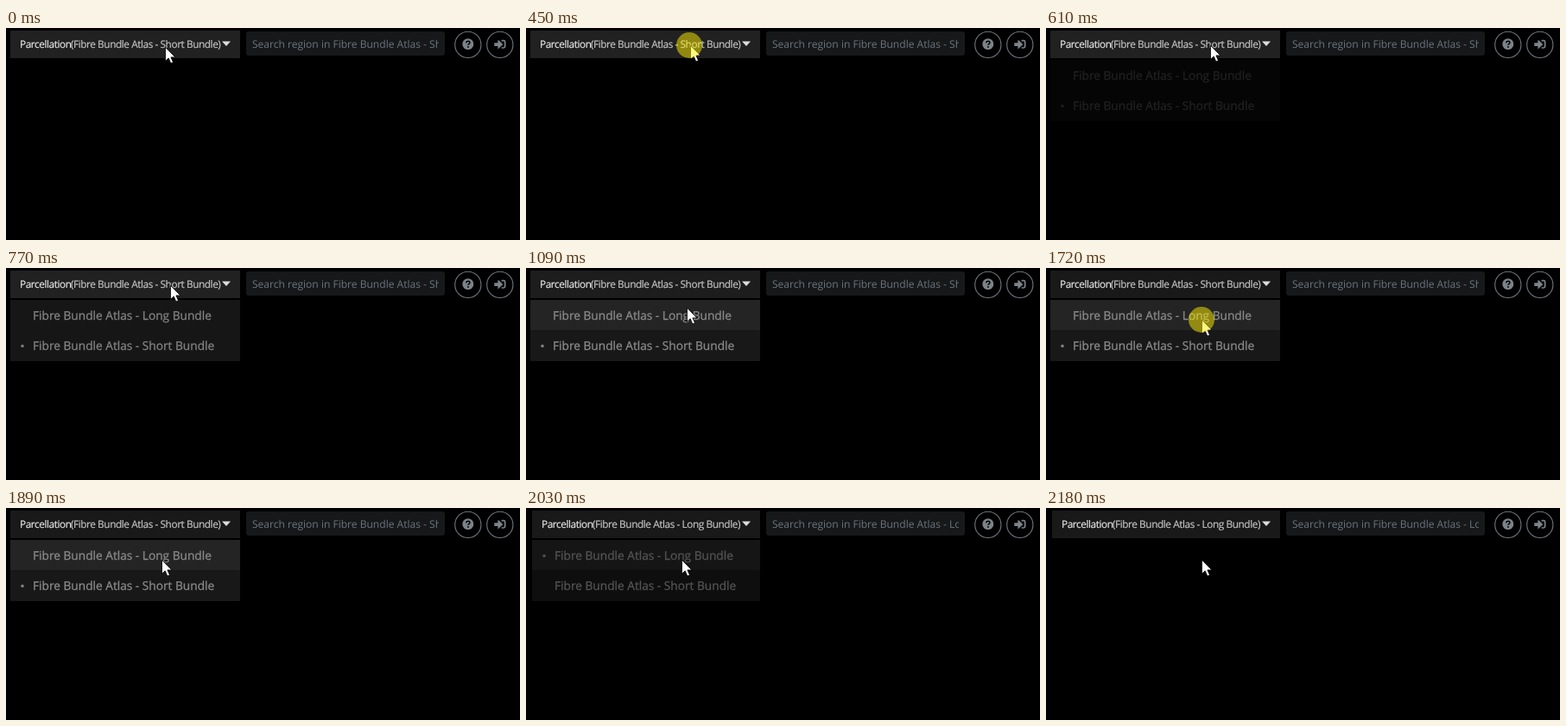
Write an HTML page that moves like this. It is 595 px wide and 246 px high and loops after 2500 ms.

```html
<!DOCTYPE html>
<html lang="en">
<head>
<meta charset="utf-8">
<style>
html, body { margin: 0; width: 100%; height: 100%; overflow: hidden; background: #000; }
svg { display: block; }
text { font-family: "Open Sans", "Noto Sans", sans-serif; text-rendering: geometricPrecision; white-space: pre; }
.title { font-size: 11.8px; letter-spacing: -.42px; stroke-width: .2; }
.item { font-size: 13.7px; fill: #8a8a8a; stroke: #8a8a8a; stroke-width: .3; }
.search { font-size: 12.06px; fill: #6c757d; }
.ring { fill: none; stroke: #6c757d; stroke-width: 1.1; }
.icon { fill: #7b838a; }
</style>
</head>
<body>
<svg width="595" height="246" viewBox="0 0 595 246">
  <clipPath id="field"><rect x="285" y="4" width="216" height="28"/></clipPath>

  <rect id="button" y="3" height="32"/>
  <g id="title" class="title">
    <text x="16" y="23.3" fill="#e4e4e4" stroke="#e4e4e4">Parcellation</text>
    <text id="choice" x="75" y="23.3" fill="#c2c2c2" stroke="#c2c2c2"></text>
  </g>
  <path d="M250 15.5h10l-5 5.5z" fill="#dcdcdc"/>

  <rect x="278" y="4" width="230" height="28" rx="3" fill="#16181a"/>
  <text id="search" class="search" x="285" y="23" clip-path="url(#field)"></text>

  <circle class="ring" cx="534.8" cy="19.4" r="15.1"/>
  <circle class="icon" cx="534.8" cy="18.7" r="6.5"/>
  <path d="M532.8 17.3q.2-2 2.1-2 2 0 2 1.7 0 1-1.1 1.6-.9.5-.9 1.2" fill="none" stroke="#000" stroke-width="1.5"/>
  <circle cx="534.9" cy="21.9" r=".95"/>

  <circle class="ring" cx="571.8" cy="19.4" r="15.1"/>
  <path class="icon" transform="translate(565.2 12.2) scale(.026)" d="M416 448h-84q-12 0-12-12v-40q0-12 12-12h84q32 0 32-32V160q0-32-32-32h-84q-12 0-12-12V76q0-12 12-12h84q96 0 96 96v192q0 96-96 96zM369 247 201 79c-15-15-41-4.5-41 17v96H24q-24 0-24 24v96q0 24 24 24h136v96c0 21.5 26 32 41 17l168-168q14-17 0-34z"/>

  <g id="menu">
    <rect id="row0" y="37" height="35"/>
    <rect id="row1" y="72" height="36"/>
    <g id="items" class="item">
      <text x="31" y="60">Fibre Bundle Atlas - Long Bundle</text>
      <text x="31" y="95">Fibre Bundle Atlas - Short Bundle</text>
      <circle id="dot" cx="19" r="1.6"/>
    </g>
  </g>

  <path id="cursor" d="M0 0V16L3.7 12.6 6.3 18.6 9 17.4 6.4 11.6H11.4Z" fill="#fff" stroke="#000" stroke-width=".8"/>
  <circle id="click" r="15" fill="#fff000" fill-opacity=".5"/>
</svg>
<script>
const LOOP = 2500;
// The screen refreshes only at these moments.
const TICKS = [0, 210, 290, 370, 450, 610, 690, 770, 860, 930, 1010, 1090, 1160,
  1250, 1330, 1400, 1490, 1570, 1650, 1720, 1890, 1950, 2030, 2110, 2180];
// start, end, x and y reached
const MOVES = [[150, 370, 190, 20], [860, 1330, 182, 74], [1330, 1650, 180, 60]];

const $ = id => document.getElementById(id);
const set = (id, attrs) => {
  for (const k in attrs) $(id).setAttribute(k, attrs[k]);
};
const ramp = (t, a, b) => Math.min(1, Math.max(0, (t - a) / (b - a)));
const smooth = p => p * p * (3 - 2 * p);
const gray = v => `rgb(${v},${v},${v})`;

function pointer(t) {
  let x = 184, y = 22;
  for (const [a, b, tx, ty] of MOVES) {
    const p = smooth(ramp(t, a, b));
    x += (tx - x) * p;
    y += (ty - y) * p;
  }
  return [Math.round(x), Math.round(y)];
}

function draw(time) {
  const t = TICKS.filter(v => v <= time).pop();
  const [x, y] = pointer(t);
  const long = t >= 1950;
  const shift = long ? 2 : 0;
  const box = { x: 5 + shift, width: 266 - shift };
  const name = `Fibre Bundle Atlas - ${long ? "Long" : "Short"} Bundle`;

  set("button", { ...box, fill: gray(Math.round(33 - 8 * ramp(t, 1015, 1165))) });
  set("title", { transform: `translate(${shift})` });
  $("choice").textContent = `(${name})`;
  $("search").textContent = `Search region in ${name}`;

  set("menu", { opacity: ramp(t, 560, 780) * (1 - ramp(t, 1930, 2180)) });
  set("row0", { ...box, fill: gray(y >= 37 && y < 72 ? 36 : 24) });
  set("row1", { ...box, fill: gray(y >= 72 ? 36 : 24) });
  set("items", { transform: `translate(${shift})` });
  set("dot", { cy: long ? 55.5 : 90.5 });

  const first = t >= 450 && t < 610, second = t >= 1720 && t < 1890;
  set("click", { cx: first ? 189 : 180, cy: first ? 20 : 60, opacity: first || second ? 1 : 0 });
  set("cursor", { transform: `translate(${x + .5} ${y + .3})` });
}

const start = performance.now();
function frame() {
  draw((performance.now() - start) % LOOP);
  requestAnimationFrame(frame);
}
frame();
</script>
</body>
</html>
```
